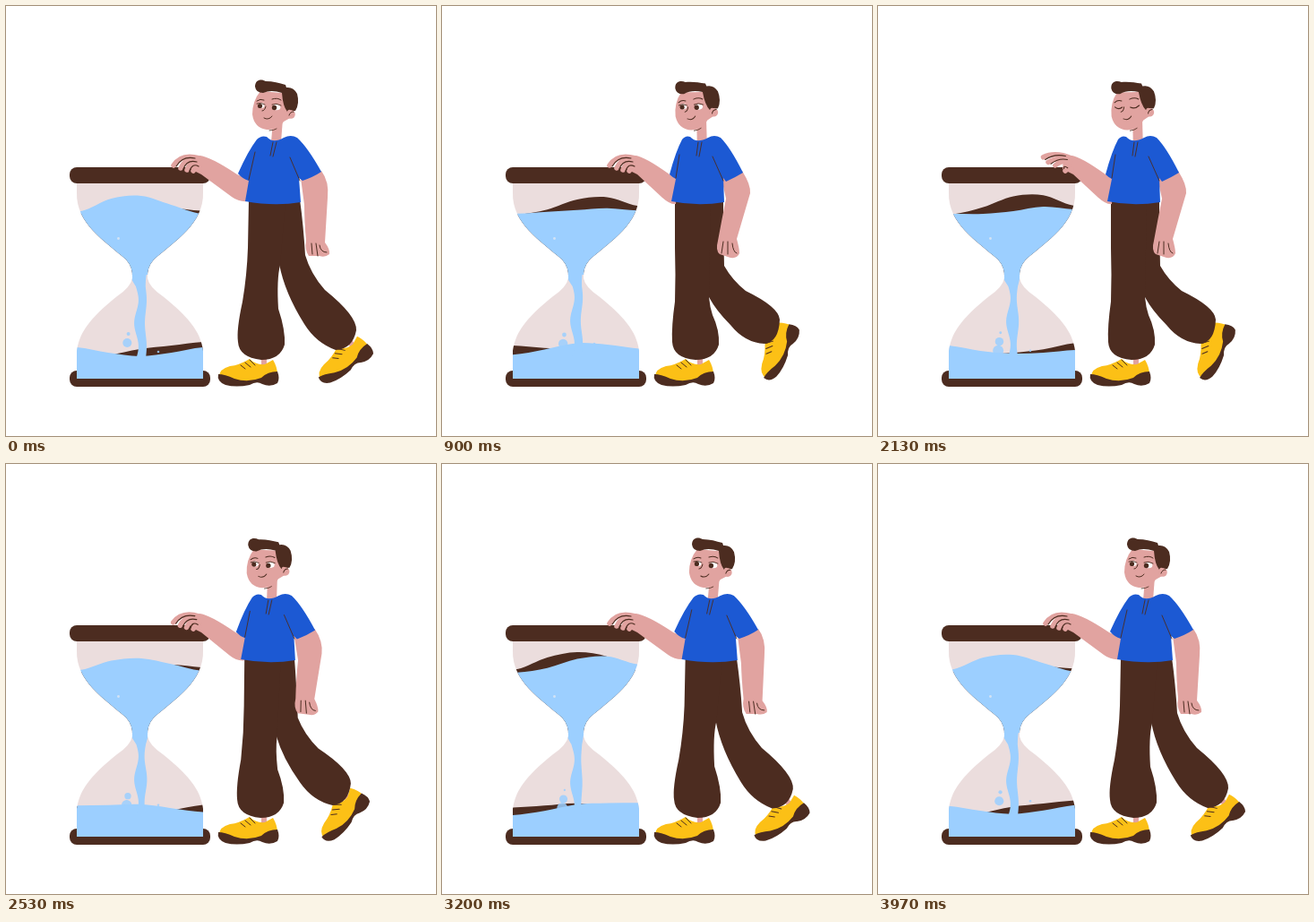
An HTML page with a canvas for the animation above (4000 ms loop, 480 by 480 pixels).

```html
<!DOCTYPE html>
<html lang="en">
<head>
<meta charset="utf-8">
<title>Hourglass</title>
<style>
html, body { margin: 0; height: 100%; overflow: hidden; background: #fff; }
canvas { display: block; }
</style>
</head>
<body>
<canvas id="stage" width="480" height="480"></canvas>
<script>
const LOOP = 4000;
const BROWN = '#4c2c20', BLUE = '#9ccfff', GLASS = '#ebdddd',
      SKIN = '#e1a3a0', SHIRT = '#1c59d3', GOLD = '#fcc016';
const c = document.getElementById('stage').getContext('2d');
c.lineCap = c.lineJoin = 'round';

const lerp = (a, b, u) => a + (b - a) * u;
const ease = u => u * u * (3 - 2 * u);
const clamp = u => Math.max(0, Math.min(1, u));
const ramp = (t, a, b) => ease(clamp((t - a) / (b - a)));

// Eased value of a list of [time, number or list] keys.
function track(keys, t) {
  let i = 1;
  while (i < keys.length - 1 && t > keys[i][0]) i++;
  const [t0, a] = keys[i - 1], [t1, b] = keys[i];
  const u = clamp((t - t0) / (t1 - t0));
  return a.map ? a.map((v, k) => lerp(v, b[k], u)) : lerp(a, b, ease(u));
}

// Blend two path strings that share one structure.
function blend(a, b, u) {
  const to = b.match(/-?[\d.]+/g);
  let i = 0;
  return a.replace(/-?[\d.]+/g, n => lerp(+n, +to[i++], u).toFixed(2));
}

function fill(d, color) {
  c.fillStyle = color;
  c.fill(new Path2D(d));
}
function line(d, width = 1, color = BROWN) {
  c.strokeStyle = color;
  c.lineWidth = width;
  c.stroke(new Path2D(d));
}
function dot(x, y, rx, color, ry = rx) {
  c.fillStyle = color;
  c.beginPath();
  c.ellipse(x, y, rx, ry, 0, 0, 7);
  c.fill();
}
function bar(y) {
  c.fillStyle = BROWN;
  c.beginPath();
  c.roundRect(71, y, 157, 18, 8);
  c.fill();
}
function group(draw, x, y, angle = 0, px = 0, py = 0) {
  c.save();
  c.translate(x, y);
  c.rotate(angle * Math.PI / 180);
  c.translate(-px, -py);
  draw();
  c.restore();
}

// ---------- hourglass ----------
const glass = `M79 190H220V208C221 243 189 262 165 283Q157 292 158 304Q160 314 175 324
  C202 346 217 362 220 385V416H79V385C82 362 97 346 124 324Q139 314 141 304
  Q142 292 134 283C110 262 78 243 79 208Z`;

// Surface heights at five even places, by phase of the wave.
const upper = { period: LOOP / 3, lag: 400, x: 84, step: 33.5, floor: 300, keys: [
  [0, [229, 215, 212, 222, 232]],
  [97, [229, 216, 210, 216, 231]],
  [203, [229, 216, 210, 213, 228]],
  [430, [233, 226, 213, 211, 222]],
  [797, [232, 232, 229, 224, 227]],
  [863, [232, 231, 229, 226, 228]],
  [LOOP / 3, [229, 215, 212, 222, 232]]
] };
const lower = { period: LOOP / 2, lag: 570, x: 79, step: 35.2, floor: 416, keys: [
  [0, [381, 387, 391, 387, 381]],
  [130, [379, 385, 388, 387, 384]],
  [430, [379, 380, 381, 386, 390]],
  [870, [389, 383, 376, 378, 383]],
  [1430, [394, 390, 383, 379, 375]],
  [1530, [392, 389, 387, 383, 376]],
  [LOOP / 2, [381, 387, 391, 387, 381]]
] };

function wave(w, t, color) {
  const h = track(w.keys, (t + w.period) % w.period);
  const at = i => h[Math.max(0, Math.min(4, i))];
  let d = `M70 ${w.floor}V${h[0]}H${w.x}`;
  for (let i = 0; i < 4; i++) {
    const x = w.x + i * w.step, third = w.step / 3;
    d += `C${x + third} ${h[i] + (at(i + 1) - at(i - 1)) / 6} ` +
      `${x + 2 * third} ${h[i + 1] - (at(i + 2) - h[i]) / 6} ${x + w.step} ${h[i + 1]}`;
  }
  fill(d + `H230V${w.floor}Z`, color);
}

function stream(t) {
  const turn = t / LOOP * 2 * Math.PI;
  const crest = 328 + 3 * Math.sin(3 * turn);
  const sway = Math.cos(turn - .8);
  const left = [], right = [];
  for (let y = 297; y <= 391; y += 2) {
    const s = Math.cos((y - crest) / 52 * 2 * Math.PI);
    const flare = Math.max(0, (313 - y) / 16);
    left.push(`${145.5 + 2.4 * s - 6 * flare} ${y}`);
    right.unshift(`${156 + 1.4 * s * sway + 2 * flare} ${y}`);
  }
  fill('M' + left.concat(right).join('L') + 'Z', BLUE);
}

function bubbles(t) {
  c.globalAlpha = .85;
  for (let k = 0; k < 3; k++) {
    const age = t % 1000 + k * 1000, rise = age / 100;
    const r = (6 - .01 * rise * rise) * ramp(age, 0, 130);
    if (r > .2) dot(134 + rise * .13, 386 - rise, r, BLUE);
  }
  dot(170, 386 - t % 1000 / 100, 1.3, BLUE);
  c.globalAlpha = 1;
}

function hourglass(t) {
  bar(407);
  fill(glass, GLASS);
  c.save();
  c.clip(new Path2D(glass));
  wave(upper, t - upper.lag, BROWN);
  wave(upper, t, BLUE);
  dot(125.5, 259.5, 1.4, '#d3e3f5');
  wave(lower, t - lower.lag, BROWN);
  bubbles(t);
  wave(lower, t, BLUE);
  stream(t);
  c.restore();
  bar(180);
}

// ---------- man ----------
function shoe() {
  fill('M285 390H291V404H285Z', SKIN);
  fill('M238 414Q238 405 250 402Q260 401 272 394Q279 401 289 400L298 395Q303 403 303 412L284 420H255Z', GOLD);
  fill(`M237 411Q235 419 245 423Q257 426 272 423Q280 418 286 422Q295 426 303 421
    Q306 416 303 408Q292 408 285 415Q270 421 255 416Q244 411 237 411Z`, BROWN);
  line('M262 401L267 405M267 398L273 403M272 395L278 401');
}

function backLeg(p) {
  group(shoe, lerp(386, 372, p), lerp(376, 363, p), lerp(-32, -62, p), 289, 398);
  fill(blend(
    'M300 212L328 216Q332 245 334 278Q340 299 356 317Q392 346 391 362Q387 383 368 384Q346 376 333 355Q311 320 305 288Z',
    'M285 212L314 216Q314 245 315 290Q324 306 339 318Q376 336 377 350Q376 375 360 377Q338 376 322 356Q306 340 298 325Z',
    p), BROWN);
}

function frontLeg(p) {
  shoe();
  fill(blend(
    'M271 217L312 217L306 289Q302 305 304 338Q312 362 311 378Q306 395 285 395Q260 392 259 375Q257 362 264 330Q269 300 270 270Z',
    'M260 217L300 217L298 325Q299 336 302 345Q310 362 309 378Q304 395 283 395Q258 393 257 375Q256 358 260 330Q261 300 260 270Z',
    p), BROWN);
}

function hangingArm(p) {
  fill(blend(
    'M329 192L352 184Q361 196 359 214L356 264Q362 272 361 277Q356 281 350 279L338 279Q333 272 335 262Q333 238 333 222Z',
    'M312 192L335 184Q345 200 344 209L329 260Q332 271 332 276Q330 282 322 281L310 277Q305 273 308 262Q312 240 317 215Z',
    p), SKIN);
  line(blend(
    'M341 265L342 277M346 265L348 279M350 267Q351 275 358 275',
    'M314 263L312 276M319 263L319 277M324 265Q325 275 329 276', p));
}

function restingArm(p, lift) {
  fill(blend(
    'M216 167Q228 168 258 188L272 194L270 218Q260 219 252 213L218 188L206 182L207 168Z',
    'M216 167Q226 168 254 188L263 192L261 221Q255 222 246 214L218 188L206 182L207 168Z',
    p), SKIN);
  const fingers = [
    ['M216 170Q196 164 187 178', 'M216 170Q198 162 184 167'],
    ['M215 173Q200 169 195 181', 'M215 172Q202 167 189 173'],
    ['M216 176Q206 172 202 183', 'M215 174Q206 171 197 177'],
    ['M216 181Q212 180 209 184', 'M216 182Q212 181 209 184']
  ];
  for (const [down, up] of fingers) line(blend(down, up, lift), 5.5, SKIN);
  line(blend(
    'M211 170Q197 167 190 179M213 174Q202 171 198 182M215 179Q208 175 205 184',
    'M209 167Q197 164 186 170M211 171Q202 169 192 175M206 182Q207 178 213 180',
    lift), 1.2);
}

function head(closed) {
  fill('M298 128L296 152H307L309 126Z', SKIN);
  fill('M284 95Q275 106 275 121Q277 136 291 138Q304 139 310 129L319 124V98Z', SKIN);
  line('M294 139Q299 139 302 137', .8);
  fill(`M278 90C278 82 285 81 290 84C298 84 305 86 312 88L313 91Q321 90 325 98
    Q328 109 323 117L319 117Q315 114 314 118Q309 112 308 97Q296 93 287 97Q279 97 278 90Z`, BROWN);
  dot(318, 121, 4.8, SKIN);
  line('M316 122Q317 118 321 118M280 106Q284 103 288 105M297 104Q303 102 307 105', 1);
  line('M290 112Q289 117 286 117M288 125Q293 128 297 123', 1);
  if (closed > .6) {
    line('M280 111Q284 115 288 112M297 113Q302 116 307 112', 1.1);
  } else {
    const open = 1 - closed;
    dot(285, 111, 3.6, '#fff', 3 * open);
    dot(302, 113, 4.4, '#fff', 3.2 * open);
    dot(283.5, 111.5, 2.6, BROWN, 2.6 * open);
    dot(299.5, 113.5, 2.7, BROWN, 2.7 * open);
    line('M280 109Q284 107 289 110M297 110Q302 108 307 111', .9);
  }
}

function shirt(p) {
  fill(blend(
    'M291 146Q298 154 310 147Q318 143 325 147Q337 158 352 185Q343 191 331 195L327 192L329 219Q300 224 267 218L271 195Q264 193 259 187Q270 162 280 149Q285 144 291 146Z',
    'M277 146Q284 154 297 147Q304 143 311 147Q322 158 336 186Q328 191 317 196L314 192L315 219Q285 224 256 218L261 193Q257 191 254 188Q261 162 268 149Q272 144 277 146Z',
    p), SHIRT);
  line(blend(
    'M298 152L295 167M302 152L298 168M278 163L271 194M317 169L328 195',
    'M286 152L284 167M290 152L287 168M265 166L261 192M302 168L314 195', p), .9);
}

function man(t) {
  // 0: standing upright, 1: leaning on the hourglass
  const p = track([[0, 0], [30, 0], [420, 1.03], [900, 1], [2200, 1], [2870, -.15], [3450, 0], [LOOP, 0]], t);
  const step = ramp(t, 80, 400) * (1 - ramp(t, 450, 900));
  const tap = t % 800;
  const lift = ramp(tap, 90, 300) * (1 - ramp(tap, 500, 620));
  const closed = ramp(t, 1560, 1640) * (1 - ramp(t, 2180, 2270));

  group(() => backLeg(p), -1.5 * step, -4.5 * step);
  frontLeg(p);
  hangingArm(p);
  restingArm(p, lift);
  group(() => head(closed), 296 - 12.5 * p, 140, -6 * p, 296, 140);
  shirt(p);
}

function frame(now) {
  const t = now % LOOP;
  c.fillStyle = '#fff';
  c.fillRect(0, 0, 480, 480);
  hourglass(t);
  man(t);
  requestAnimationFrame(frame);
}
requestAnimationFrame(frame);
</script>
</body>
</html>
```
